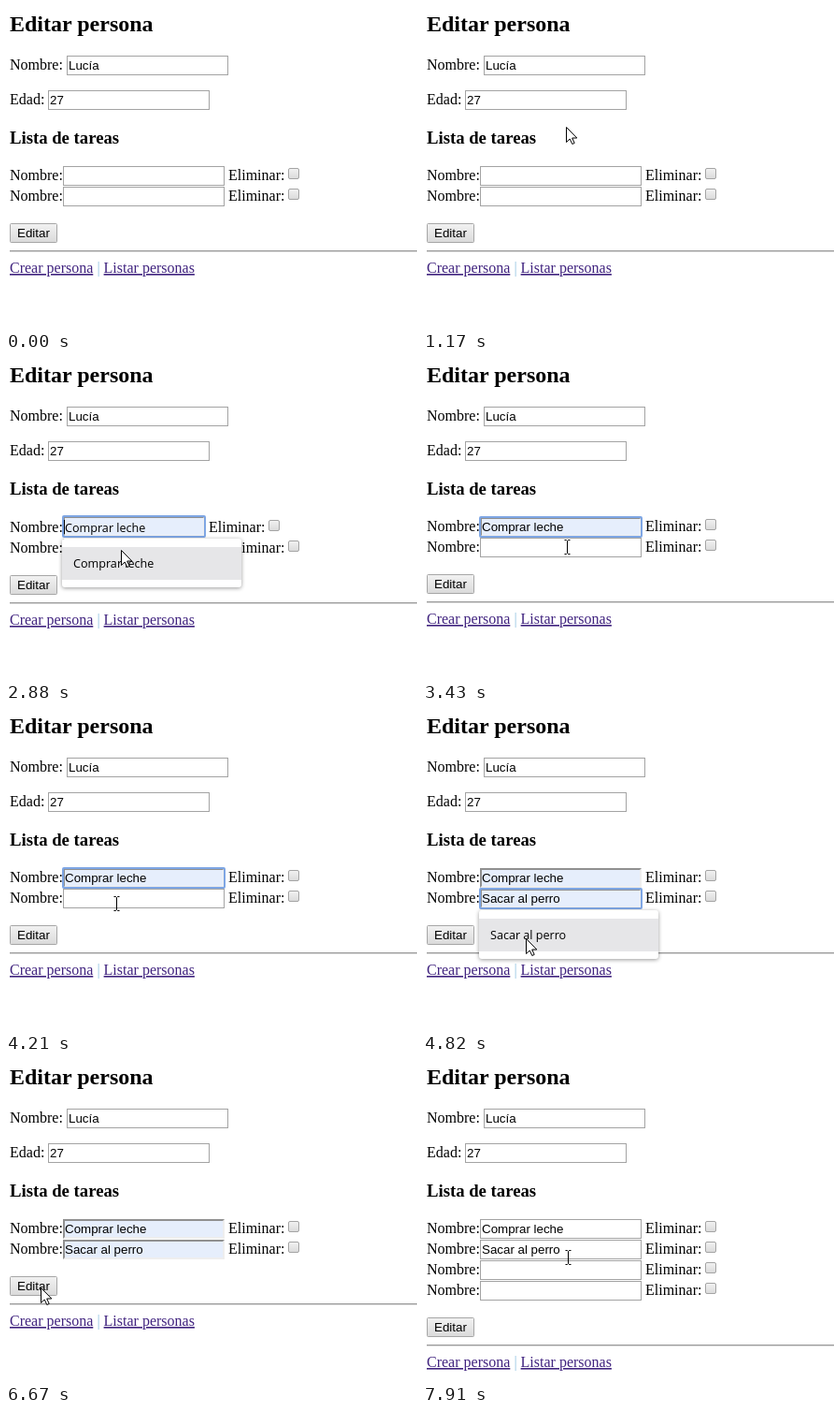
These frames come from a looping animation (440x345 px, 7990 ms). An HTML page:

```html
<!DOCTYPE html>
<html lang="es">
<head>
<meta charset="utf-8">
<title>Editar persona</title>
<style>
html, body { margin: 0; width: 100%; height: 100%; overflow: hidden; background: #fff; }
svg { display: block; width: 440px; height: 345px; font: 16px "Liberation Serif", serif; }
.h2 { font-size: 24px; font-weight: bold; }
.h3 { font-size: 18.72px; font-weight: bold; }
.ui { font: 13.333px "Liberation Sans", sans-serif; }
.menu { font: 12.6px "Open Sans", sans-serif; }
.link { fill: #40237f; text-decoration: underline; }
.bar { fill: #8fc3e2; }
.popup { filter: drop-shadow(0 1px 2px rgba(0, 0, 0, .4)); }
</style>
</head>
<body>
<svg viewBox="0 0 440 345">
  <defs>
    <linearGradient id="face" x2="0" y2="1">
      <stop stop-color="#f2f2f2"/><stop offset="1" stop-color="#dadada"/>
    </linearGradient>
  </defs>
  <g id="scene"></g>
</svg>
<script>
const LOOP = 7990, FRAME = 78;
const SUBMIT = 6600, RELOAD = 6900;
const ROWS_TOP = 171, ROW = 22;
const TASKS = [
  { name: 'Comprar leche', focus: 2250, pick: 3110, blur: 4270 },
  { name: 'Sacar al perro', focus: 4270, pick: 4820, blur: SUBMIT }
];

// Pointer strokes: each bends towards "via", or runs straight without it
const START = [350, 340];
const STROKES = [
  { from: 620, until: 1400, via: [16, -30], to: [228, 218] },
  { from: 1480, until: 2010, via: [130, 113], to: [121, 185] },
  { from: 2730, until: 2960, to: [124, 213] },
  { from: 3430, until: 4210, via: [305, 152], to: [118, 209] },
  { from: 4500, until: 4660, to: [110, 246] },
  { from: 5060, until: 5210, to: [206, 262] },
  { from: 5440, until: 5980, via: [28, 281], to: [137, 205] },
  { from: 6300, until: 6440, to: [37, 244] },
  { from: 7460, until: 7910, to: [175, 207] }
];

const within = (t, from, until) => t >= from && t < until;
const text = (x, y, str, cls = '') => `<text x="${x}" y="${y}" class="${cls}">${str}</text>`;
const rect = (x, y, w, h, attrs = '') => `<rect x="${x}" y="${y}" width="${w}" height="${h}" ${attrs}/>`;
const frame = (x, y, w, h, attrs) => rect(x + .5, y + .5, w - 1, h - 1, attrs);

function field(x, y, value, { filled, focus, preview } = {}) {
  const baseline = y + (preview ? 16 : 15);
  const [w, h] = preview ? [152, 22] : [173, 21];
  if (preview) y--;
  let out = frame(x, y, w, h, 'fill="#fff" stroke="#a3a3a3"');
  if (filled || preview) {
    out = rect(x, y, w, h, 'fill="#eee"') +
      `<path d="M${x} ${y + h}V${y}H${x + w}l-2 2H${x + 2}V${y + h - 2}z" fill="#909090"/>` +
      rect(x + 2, y + 2, w - 4, h - 4, 'fill="#e6eefc"');
  }
  if (focus) out += rect(x, y, w, h, 'rx="1" fill="none" stroke="#7ea6e4" stroke-width="2"');
  if (preview) out += rect(x + 1, y + 4, 1, 15);
  return out + text(x + 2, baseline, value, preview ? 'menu' : 'ui');
}

function taskRow(y, value, state) {
  const baseline = y + (state.preview ? 16 : 15);
  const shift = state.preview ? -21 : 0;
  return text(4, baseline, 'Nombre:') + field(61, y, value, state) +
    text(238 + shift, baseline, 'Eliminar:') +
    frame(302 + shift, baseline - 13, 12, 12, 'rx="1.5" fill="url(#face)" stroke="#a4a4a4"');
}

function popup(y, value, active) {
  return `<g class="popup">${rect(60, y, 192, 52, 'rx="3" fill="#fff"')}</g>` +
    (active ? rect(60, y + 9, 192, 35, 'fill="#e6e6e8"') : '') +
    text(72, y + 31, value, 'menu');
}

function pointerAt(t) {
  let pos = START;
  for (const { from, until, via, to } of STROKES) {
    if (t < from) break;
    const steps = Math.round((until - from) / FRAME) + 1;
    const step = Math.floor((t - from) / FRAME + .15) + 1;
    const u = Math.min(1, step / steps), v = 1 - u;
    pos = pos.map((a, k) => {
      const bend = via ? via[k] : (a + to[k]) / 2;
      return Math.round(v * v * a + 2 * u * v * bend + u * u * to[k]);
    });
  }
  return pos;
}

function pointer(t, rows, menuOpen) {
  if (t < STROKES[0].from) return '';
  const [x, y] = pointerAt(t);
  const inField = within(x, 61, 234) && within(y, ROWS_TOP, ROWS_TOP + rows * ROW);
  const shape = inField && !menuOpen
    ? '<path d="M-2.5-7.5H-.5L.5-6.5 1.5-7.5H3.5M.5-6.5V6.5M-2.5 7.5H-.5L.5 6.5 1.5 7.5H3.5" fill="none" stroke="#000"/>'
    : '<path d="M.5.5V16.5L4.2 13 6.8 18.5 9.2 17.4 6.7 12H11.8z" fill="#fff" stroke="#000"/>';
  return `<g transform="translate(${x} ${y})">${shape}</g>`;
}

function footer(y, pressed) {
  return frame(4, y, 51, 21, `rx="1" fill="${pressed ? '#d2d2d2' : 'url(#face)'}" stroke="#a6a6a6"`) +
    text(12, y + 15, 'Editar', 'ui') +
    rect(4, y + 29, 436, 1, 'fill="#9a9a9a"') + rect(4, y + 30, 436, 1, 'fill="#d8d8d8"') +
    text(4, y + 53, 'Crear persona', 'link') +
    text(97.5, y + 53, '|', 'bar') +
    text(104.6, y + 53, 'Listar personas', 'link');
}

function draw(t) {
  const saved = t >= RELOAD;
  const rows = saved ? 4 : 2;
  let y = ROWS_TOP, menu = '';
  let out = text(4, 27, 'Editar persona', 'h2') +
    text(4, 68, 'Nombre:') + field(65, 53, 'Lucía') +
    text(4, 105, 'Edad:') + field(45, 90, '27') +
    text(4, 147, 'Lista de tareas', 'h3');

  for (let i = 0; i < rows; i++) {
    const task = TASKS[i];
    let state = {}, value = '';
    if (task) {
      const { name, focus, pick, blur } = task;
      state = {
        focus: within(t, focus, blur),
        preview: within(t, pick - 4 * FRAME, pick),
        filled: within(t, pick, RELOAD)
      };
      if (t >= pick || state.preview) value = name;
      if (within(t, focus + FRAME, pick + FRAME)) {
        menu = popup(ROWS_TOP + 23 + ROW * i, name, t >= pick - 4 * FRAME);
      }
    }
    out += taskRow(y, value, state);
    y += ROW + (state.preview ? 1 : 0);
  }
  return out + footer(y + 17, within(t, SUBMIT, SUBMIT + 70)) + menu + pointer(t, rows, menu);
}

const scene = document.getElementById('scene');
let shown = '';
function tick() {
  const next = draw(performance.now() % LOOP);
  if (next !== shown) scene.innerHTML = shown = next;
  requestAnimationFrame(tick);
}
tick();
</script>
</body>
</html>
```
